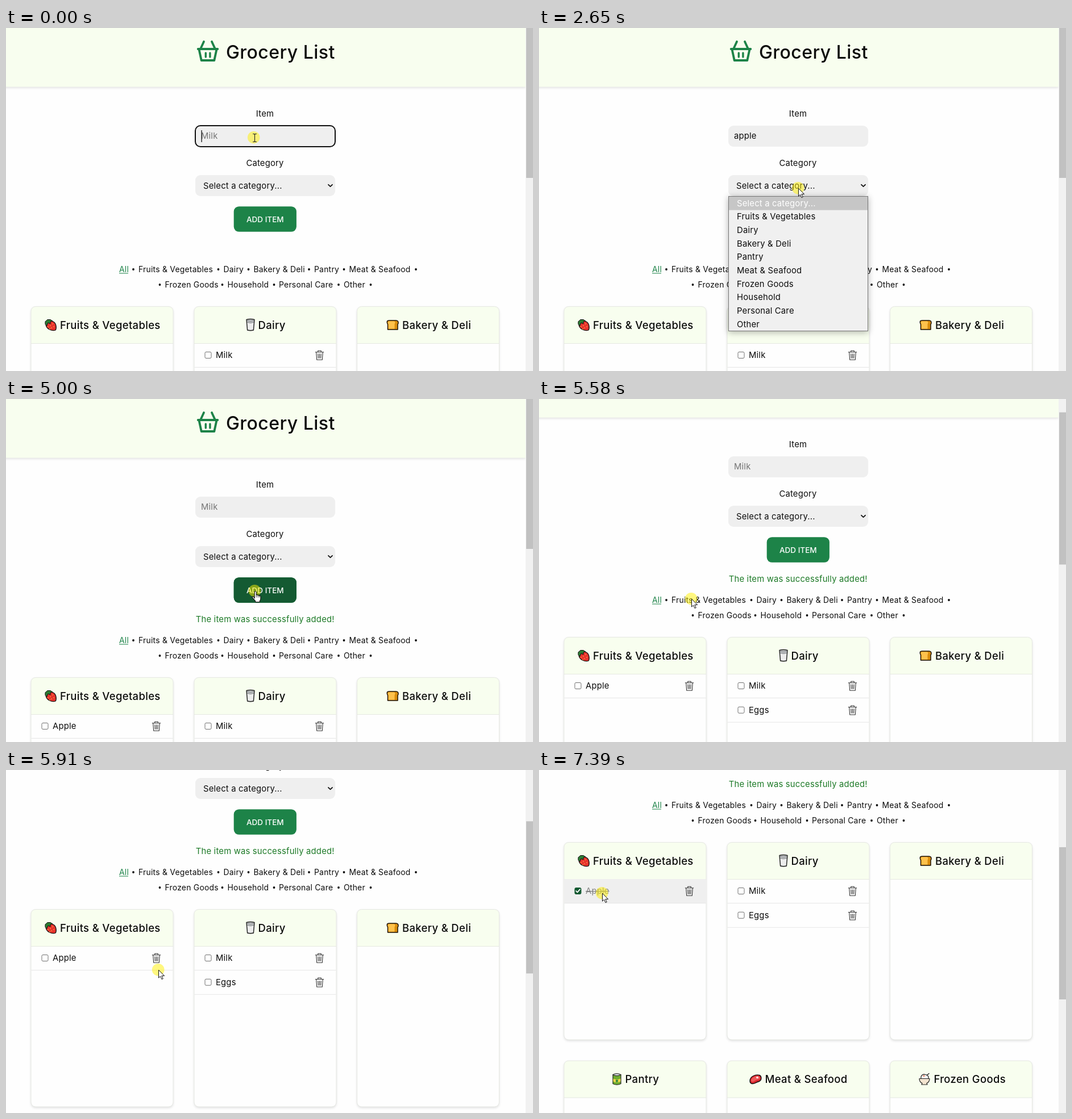
An HTML page with a canvas that plays this animation: 927x604 px, repeating every 8000 ms.

```html
<!DOCTYPE html>
<html lang="en">
<head>
<meta charset="utf-8">
<title>Grocery List</title>
<style>
html, body { margin: 0; width: 100%; height: 100%; overflow: hidden; background: #fefefe; }
canvas { display: block; }
</style>
</head>
<body>
<canvas id="stage" width="927" height="604"></canvas>
<script>
const ctx = document.getElementById('stage').getContext('2d');
const LOOP = 8000;
const GREEN = '#1d8348', DARK_GREEN = '#145a32', PALE = '#f8feef', INK = '#0c0c0c';
const STYLES = {
  title: ['500 32px', 0.45],
  card: ['500 18.5px', 0.32],
  body: ['400 14.8px', 0.2],
  nav: ['400 13.9px', 0.24],
  button: ['500 13.5px', 0]
};
const CATEGORIES = ['Fruits & Vegetables', 'Dairy', 'Bakery & Deli', 'Pantry',
  'Meat & Seafood', 'Frozen Goods', 'Household', 'Personal Care', 'Other'];
const PROMPT = 'Select a category...';

// Time, then value(s); straight lines in between.
const SCROLL = [[5440, 0], [5490, 14], [5580, 71], [5630, 88], [5670, 91], [5740, 91],
  [5790, 115], [5850, 180], [5910, 244], [5940, 262], [5970, 272], [6370, 272],
  [6400, 278], [6460, 325], [6510, 352], [6560, 363]];
const POINTER = [[1520, 436, 193], [1640, 440, 205], [1850, 452, 258], [2030, 456, 277],
  [2620, 456, 277], [2650, 456, 282], [2850, 447, 314], [3060, 438, 332],
  [3380, 438, 332], [3580, 438, 338], [5000, 438, 338], [5100, 405, 341],
  [5250, 312, 349], [5400, 268, 352], [6530, 268, 352], [6640, 238, 322],
  [6830, 145, 245], [7010, 111, 217]];

function track(keys, t) {
  if (t <= keys[0][0]) return keys[0].slice(1);
  for (let i = 1; i < keys.length; i++) {
    const a = keys[i - 1], b = keys[i];
    if (t < b[0]) {
      const u = (t - a[0]) / (b[0] - a[0]);
      return a.slice(1).map((v, k) => v + (b[k + 1] - v) * u);
    }
  }
  return keys[keys.length - 1].slice(1);
}

const clamp = v => Math.max(0, Math.min(1, v));

function setStyle(style) {
  const [font, spacing] = STYLES[style];
  ctx.font = font + ' Inter, sans-serif';
  ctx.letterSpacing = spacing + 'px';
}

function text(str, x, y, style = 'body', color = INK, align = 'left') {
  setStyle(style);
  ctx.fillStyle = color;
  ctx.textAlign = align;
  ctx.fillText(str, x, y);
}

function textWidth(str, style = 'body') {
  setStyle(style);
  return ctx.measureText(str).width;
}

function rect(x, y, w, h, color) {
  ctx.fillStyle = color;
  ctx.fillRect(x, y, w, h);
}

function round(x, y, w, h, r, fill, stroke, width = 1) {
  ctx.beginPath();
  ctx.roundRect(x, y, w, h, r);
  if (fill) { ctx.fillStyle = fill; ctx.fill(); }
  if (stroke) { ctx.strokeStyle = stroke; ctx.lineWidth = width; ctx.stroke(); }
}

function dot(x, y, r, color) {
  ctx.fillStyle = color;
  ctx.beginPath();
  ctx.arc(x, y, r, 0, Math.PI * 2);
  ctx.fill();
}

function path(d, fill, stroke, width = 1.2) {
  const p = new Path2D(d);
  if (fill) { ctx.fillStyle = fill; ctx.fill(p); }
  if (stroke) { ctx.strokeStyle = stroke; ctx.lineWidth = width; ctx.stroke(p); }
}

function at(x, y, draw) {
  ctx.save();
  ctx.translate(x, y);
  ctx.lineJoin = ctx.lineCap = 'round';
  draw();
  ctx.restore();
}

function withShadow(blur, dy, alpha, draw) {
  ctx.save();
  ctx.shadowColor = `rgba(0,0,0,${alpha})`;
  ctx.shadowBlur = blur;
  ctx.shadowOffsetY = dy;
  draw();
  ctx.restore();
}

const ICONS = {
  strawberry() {
    path('M-8 -2C-8 -8 0 -8 5 -6C11 -3 11 6 9 9C4 11 -8 8 -8 -2Z', '#e8322d', '#111', 1.3);
    path('M-9 -2L-9 -6L-5 -9.5L0 -9.5L4 -7L0 -6L0 -2L-4 -4L-6 1Z', '#2c7d33', '#111', 1);
    for (const [x, y] of [[-4, 3], [0, 1], [4, -2], [6, 3], [2, 5], [-1, 7]]) dot(x, y, 0.8, '#ffc94a');
  },
  glass() {
    path('M-7 -9.5Q0 -11.5 7 -9.5L5.4 9Q0 10.5 -5.4 9Z', '#c6c8ca', '#222', 1.4);
    path('M-5.4 -4H5.4L4.3 7.8Q0 9 -4.3 7.8Z', '#ececec');
    path('M-5.8 -7.5Q0 -5.5 5.8 -7.5M-5.6 -4.5Q0 -2.5 5.6 -4.5', null, '#777b7f', 1);
  },
  bread() {
    path('M-6 -8H6Q10.5 -8 10 -3L9 -1V8H-8.5V-1Q-12 -8 -6 -8Z', '#d98c0c', '#1c1208', 1.5);
    path('M-6 -6.8Q-10 -5.5 -7.3 -1.5V6.8H3.5V-1.5Q6 -5.5 2.5 -6.8Z', '#ffc24c');
  },
  can() {
    path('M-7 -8V8Q0 11.5 7 8V-8Z', '#6fae2f', '#222');
    path('M-6.4 -1Q0 2 6.4 -1V4Q0 7 -6.4 4Z', '#f3d64a');
    path('M-7 -8Q0 -12 7 -8Q0 -4 -7 -8Z', '#d0d4d6', '#222');
    dot(0, 3, 2.2, '#2f8a3c');
  },
  meat() {
    path('M-10 3C-10 -5 0 -9 7 -7C11 -5 11 2 6 4C1 5 -1 8 -6 8Q-10 7 -10 3Z', '#d9252e', '#111', 1.4);
    path('M-8 2C-7 -4 2 -7 6 -5C9 -3 7 1 3 1C-1 2 -4 5 -6 5Z', '#ee5a5b');
    dot(3, -3, 1.8, '#fff');
  },
  ice() {
    path('M-6 -1C-7 -7 -2 -10 2 -8C6 -8 8 -4 7 -1Z', '#f3f3f3', '#222');
    path('M4 -7L8 -10', null, '#222', 1.4);
    path('M-9 -1H9Q9 5 4 7L5 9.5H-5L-4 7Q-9 5 -9 -1Z', '#f3e4d0', '#222');
    dot(-1, -6, 1.6, '#e58b6d');
  }
};

function basket() {
  at(355, 41, () => {
    path('M-17.3 -4H17.3M-15.5 -3.5L-11.3 16H11.3L15.5 -3.5M-12.5 -5L-7 -17M12.5 -5L7 -17', null, GREEN, 3.8);
    path('M-3.7 3V10M3.9 3V10', null, GREEN, 3.4);
  });
}

function trash(x, y) {
  at(x, y + 0.3, () => {
    path('M-7.2 -5.5H7.2M-2.8 -6V-8H2.8V-6M-5.8 -5.5L-4.8 8H4.8L5.8 -5.5M-2.6 -2.5L-2.2 5M0 -2.5V5M2.6 -2.5L2.2 5',
      null, '#333', 1.1);
  });
}

function checkbox(x, y, checked) {
  round(x - 5.5, y - 5.5, 11, 11, 2, checked ? DARK_GREEN : '#fff', checked ? DARK_GREEN : '#707070');
  if (checked) at(x, y, () => path('M-3.3 0L-1 2.4L3.5 -2.8', null, '#fff', 1.8));
}

function row(left, y, name, state = {}) {
  if (state.hover) rect(left + 0.5, y - 21, 249, 42, '#efefef');
  rect(left + 0.5, y + 21, 249, 1, '#e6e6e6');
  checkbox(left + 24.5, y, state.checked);
  text(name, left + 38, y + 5, 'body', state.checked ? '#858585' : INK);
  if (state.checked) rect(left + 38, y, textWidth(name), 1.2, '#777');
  trash(left + 220.5, y);
}

function card(x, y, name, icon, iconX, textX) {
  withShadow(4, 2, 0.13, () => round(x, y, 250, 347.5, 8, '#fefefe'));
  round(x, y, 250, 65, [8, 8, 0, 0], PALE);
  rect(x, y + 64.5, 250, 1, '#e6e9e1');
  round(x, y, 250, 347.5, 8, null, '#e6e8e3');
  at(iconX, y + 32.5, ICONS[icon]);
  text(name, textX, y + 39, 'card');
}

function nav() {
  const lines = [
    [425, [233, 382.5, 435.5, 542, 603.5], [224, 373.5, 426.5, 533, 594.5, 721], 0],
    [452, [279.5, 389.5, 480, 594], [270.5, 380.5, 471.5, 585, 641.5], 5]
  ];
  text('All', 199, 430, 'nav', GREEN);
  rect(199, 431.5, 16, 1, GREEN);
  for (const [y, xs, dots, first] of lines) {
    xs.forEach((x, i) => text(CATEGORIES[first + i], x, y + 5, 'nav'));
    dots.forEach(x => dot(x, y, 1.9, INK));
  }
}

function focusRing(y) {
  round(333, y, 246, 37, 9, null, '#101010', 2);
}

function typed(t) {
  if (t >= 4100) return '';
  return 'apple'.slice(0, [100, 560, 730, 900, 1000].filter(k => t >= k).length);
}

function form(t) {
  text('Item', 455.5, 156, 'body', INK, 'center');
  round(333, 172, 246, 37, 9, '#efefef');
  const word = typed(t);
  text(word || 'Milk', 343, 195, 'body', word ? INK : '#757575');
  if (t < 2180) {
    focusRing(172);
    if (t < 1540 || t >= 2030) rect(343.5 + (word ? textWidth(word) : 0), 180, 1.2, 21, '#000');
  }

  text('Category', 455.5, 243, 'body', INK, 'center');
  round(333, 259, 246, 37, 9, '#efefef');
  const chosen = t >= 3320 && t < 4100;
  text(chosen ? CATEGORIES[0] : PROMPT, 347, 282.5);
  at(570.5, 277.5, () => path('M-3.5 -1.7L0 1.7L3.5 -1.7', null, '#111', 1.8));
  if (t >= 3320 && t < 4040) focusRing(259);

  const hover = clamp((t - 3340) / 240) - clamp((t - 5120) / 200);
  round(400.7, 314.2, 110.2, 44.6, 9, GREEN);
  if (hover > 0) {
    ctx.globalAlpha = hover;
    round(400.7, 314.2, 110.2, 44.6, 9, DARK_GREEN);
    ctx.globalAlpha = 1;
  }
  text('ADD ITEM', 455.8, 341.5, 'button', '#fff', 'center');
  if (t >= 4100) text('The item was successfully added!', 455.7, 393, 'body', '#1d7a27', 'center');
}

function dropdown(pointerY) {
  withShadow(11, 2, 0.3, () => rect(333, 296, 246, 238, '#f0f0f0'));
  const step = 23.65;
  const active = pointerY > 297 + step ? 1 : 0;
  [PROMPT, ...CATEGORIES].forEach((name, i) => {
    const y = 297 + step * i;
    if (i === active) rect(334, y, 244, step, i ? '#1967d2' : '#c6c6c6');
    text(name, 348, y + 16.7, 'body', i === active ? '#fff' : i ? INK : '#8c8c8c');
  });
  ctx.strokeStyle = '#767676';
  ctx.lineWidth = 1;
  ctx.strokeRect(333.5, 296.5, 245, 237);
}

function pointer(x, y, kind) {
  dot(x - 0.3, y - 0.3, 10.8, 'rgba(255,240,0,0.5)');
  at(x, y, () => {
    if (kind === 'beam') {
      path('M-1.5 -6.5H0.5L1.5 -5.5L2.5 -6.5H4.5M1.5 -5.5V6.5M-1.5 7.5H0.5L1.5 6.5L2.5 7.5H4.5', null, '#222', 1.1);
    } else if (kind === 'hand') {
      path('M-0.5 13V2.5Q-0.5 0.5 1 0.5Q2.6 0.5 2.6 2.5V7Q4.4 6 5.4 7.6Q7 6.9 7.8 8.4Q10.2 8 10.2 10.5V14Q10.2 16 8.6 17.5V19.5H1V17.5L-4.4 11.7Q-4.6 9 -2 10.2Z',
        '#fff', '#111', 1.1);
      path('M2.6 7V11M5.4 8V11M7.8 9V11', null, '#111', 0.8);
    } else {
      path('M0.5 0.5V14L3.6 11.2L6 16.5L8.2 15.5L5.9 10.4H10.2Z', '#fff', '#111', 1);
    }
  });
}

function page(t) {
  withShadow(5, 1.5, 0.16, () => rect(-10, -20, 924, 123.7, PALE));
  basket();
  text('Grocery List', 387, 53.5, 'title');
  form(t);
  nav();
  card(44, 490.5, CATEGORIES[0], 'strawberry', 78, 95);
  card(331, 490.5, CATEGORIES[1], 'glass', 430, 443.5);
  card(617.5, 490.5, CATEGORIES[2], 'bread', 680, 697);
  card(44, 875, CATEGORIES[3], 'can', 137, 151.5);
  card(331, 875, CATEGORIES[4], 'meat', 381, 397.5);
  card(617.5, 875, CATEGORIES[5], 'ice', 678, 694.5);
}

function scrollbar(offset) {
  rect(914, 0, 13, 604, '#f1f1f1');
  rect(915, -4 + offset * 0.3855, 12, 268, '#c1c1c1');
}

function draw(t) {
  const [offset] = track(SCROLL, t);
  const [x, y] = track(POINTER, t);
  rect(0, 0, 927, 604, '#fefefe');
  ctx.save();
  ctx.translate(0, -Math.round(offset));
  page(t);
  if (t >= 4130) {
    const hover = t > 6560 && y < 234;
    row(44, 576, 'Apple', { hover, checked: t >= 7320 });
  }
  row(331, 576, 'Milk');
  row(331, 618.7, 'Eggs');
  ctx.restore();
  scrollbar(offset);

  const open = t >= 2250 && t < 3320;
  if (open) dropdown(y);
  let kind = 'arrow';
  if (t < 2000 && y < 209) kind = 'beam';
  else if (t >= 3350 && t < 5300 && x > 401) kind = 'hand';
  pointer(x, y, kind);
}

function frame() {
  draw(performance.now() % LOOP);
  requestAnimationFrame(frame);
}
frame();
</script>
</body>
</html>
```
